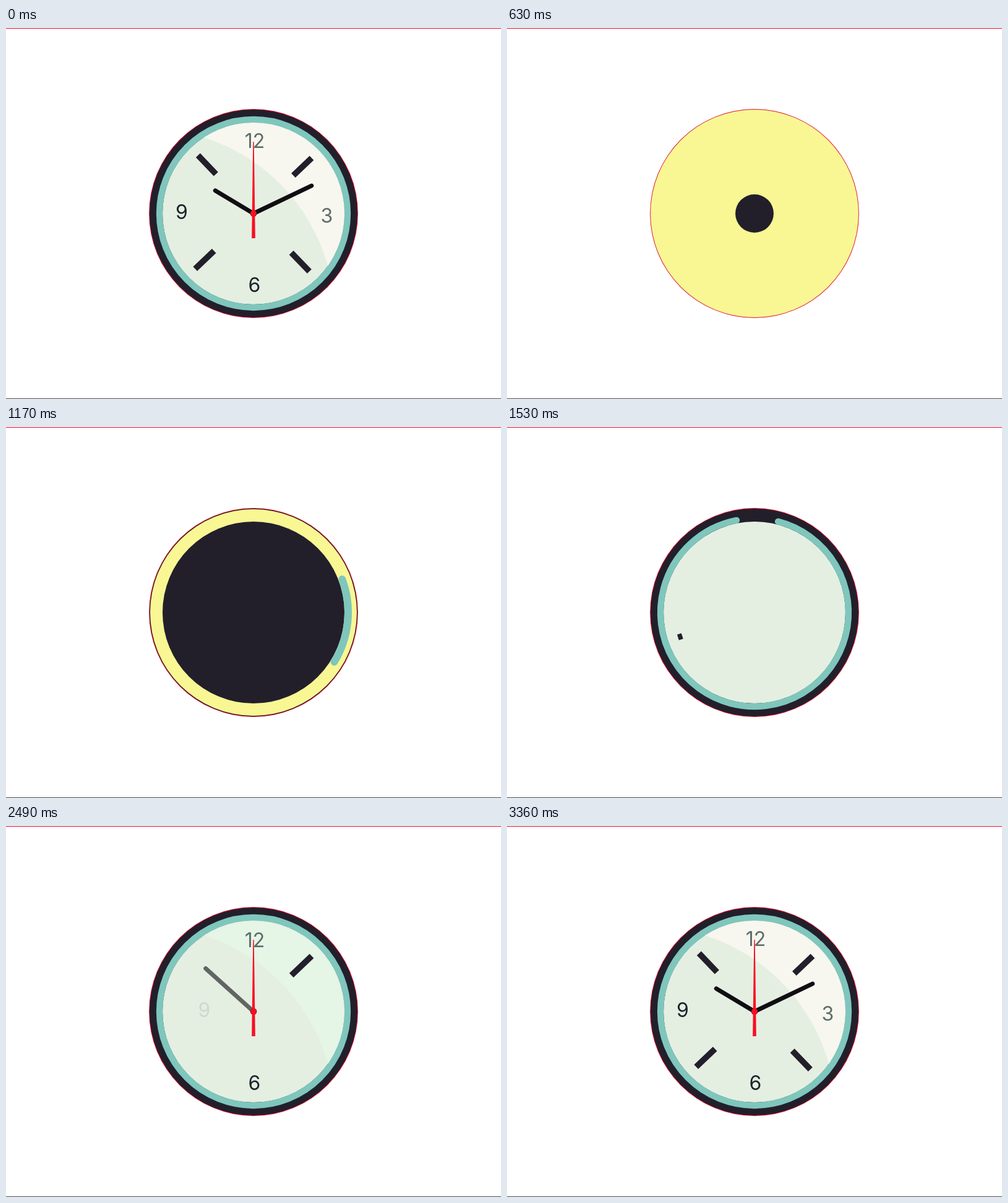
An HTML page with a canvas for the animation above (4890 ms loop, 800 by 600 pixels).

```html
<!DOCTYPE html>
<html lang="en">
<head>
<meta charset="utf-8">
<title>Clock</title>
<style>
html, body { margin: 0; width: 100%; height: 100%; overflow: hidden; background: #fff; }
canvas { display: block; width: 800px; height: 600px; }
</style>
</head>
<body>
<canvas id="stage" width="800" height="600"></canvas>
<script>
const ctx = document.getElementById('stage').getContext('2d');
const LOOP = 4890, STEP = 30, REST = 3360;
const CX = 400, CY = 300, RIM = 168, FACE = 147;
const DARK = '#221f2b', TEAL = '#7fc6bd', PALE = '#e4efe2', YELLOW = '#f8f794', RED = '#fb0d22';
const rad = deg => deg * Math.PI / 180;
const smooth = u => u * u * (3 - 2 * u);

// Eased value through [time, value] keys.
function key(t, ...keys) {
  if (t <= keys[0][0]) return keys[0][1];
  for (let i = 1; i < keys.length; i++) {
    const [t0, a] = keys[i - 1], [t1, b] = keys[i];
    if (t < t1) return a + (b - a) * smooth((t - t0) / (t1 - t0));
  }
  return keys[keys.length - 1][1];
}

const ramp = (t, from, to) => key(t, [from, 0], [to, 1]);
const pop = (t, t0) => key(t, [t0, 0], [t0 + 215, 1.107], [t0 + 365, 0.99], [t0 + 485, 1]);

function disc(r, color) {
  if (r <= 0) return;
  ctx.fillStyle = color;
  ctx.beginPath();
  ctx.arc(CX, CY, r, 0, 7);
  ctx.fill();
}

// Line along a radius, between two distances from the centre.
function spoke(deg, r0, r1, width, color, cap = 'butt') {
  if (r0 === r1) return;
  const c = Math.cos(rad(deg)), s = Math.sin(rad(deg));
  ctx.strokeStyle = color;
  ctx.lineWidth = width;
  ctx.lineCap = cap;
  ctx.beginPath();
  ctx.moveTo(CX + c * r0, CY + s * r0);
  ctx.lineTo(CX + c * r1, CY + s * r1);
  ctx.stroke();
}

function numeral(text, x, y, color, alpha) {
  ctx.globalAlpha = alpha;
  ctx.fillStyle = color;
  ctx.fillText(text, x, y + 11.5);
  ctx.globalAlpha = 1;
}

function drawBody(t) {
  const yellow = RIM * pop(t, 0);
  disc(yellow + 0.9, '#e0102c');
  if (t >= 1110) disc(RIM, DARK);
  if (t < 1440) disc(key(t, [1080, yellow], [1170, RIM - 1], [1410, FACE - 1]), YELLOW);
  if (t < 1560) disc(FACE * pop(t, 570), DARK);
  disc(FACE * ramp(t, 1200, 1470), PALE);
}

function drawRing(t) {
  if (t < 1110) return;
  const from = key(t, [1080, 4], [1170, -20.6], [1530, -75.5], [1680, -90]);
  const to = key(t, [1080, 6], [1170, 31.5], [1530, 259], [1680, 270]);
  ctx.strokeStyle = TEAL;
  ctx.lineWidth = key(t, [1170, 12], [1400, 10.3]);
  ctx.lineCap = 'round';
  ctx.beginPath();
  ctx.arc(CX, CY, key(t, [1170, 153], [1400, 152]), rad(from), rad(to));
  ctx.stroke();
}

function drawGlare(t) {
  const alpha = ramp(t, 2220, 2400);
  if (!alpha) return;
  const warm = ramp(t, 2490, 2700);
  const mix = (a, b) => Math.round(a + (b - a) * warm);
  ctx.save();
  ctx.globalAlpha = alpha;
  ctx.fillStyle = `rgb(${mix(229, 247)},${mix(245, 247)},${mix(230, 239)})`;
  ctx.beginPath();
  ctx.arc(CX, CY, FACE, 0, 7);
  ctx.clip();
  ctx.beginPath();
  ctx.rect(0, 0, 800, 600);
  ctx.arc(229, 465, 302, 0, 2 * Math.PI);
  ctx.fill('evenodd');
  ctx.restore();
}

function drawTicks(t) {
  // Two long bars swing in and cross, then retract.
  if (t < 2340) {
    const tail = 130 - 258 * ramp(t, 1480, 1980);
    const first = key(t, [1440, 155], [1530, 162], [1860, 227]);
    spoke(first, key(t, [2100, tail], [2340, 130]), 130, 9.5, DARK);
  }
  const tail = 130 - 258 * ramp(t, 1680, 2130);
  const second = key(t, [1650, 252], [1980, 317.1], [2520, 316.3]);
  spoke(second, key(t, [2160, tail], [2520, 89]), 130, 9.7, DARK);

  [46, 136.5, 226.4].forEach((deg, i) => {
    const start = 2580 + i * 90;
    spoke(deg, 130 - 42 * ramp(t, start, start + 210), 130, 9.7, DARK);
  });
}

function drawNumerals(t) {
  ctx.font = '32px Inter, "Open Sans", sans-serif';
  ctx.textAlign = 'center';
  const gray = '#5d6d6a', ink = '#1d222b';
  numeral('12', 402, key(t, [2200, 240], [2430, 184], [2730, 184], [2850, 182.5]), gray, ramp(t, 2220, 2430));
  numeral('6', 401.5, key(t, [2220, 360], [2460, 415.5]), ink, ramp(t, 2240, 2450));
  numeral('9', key(t, [2370, 345], [2640, 286], [2760, 268], [2910, 284]), 297, ink, ramp(t, 2460, 2610));
  numeral('3', key(t, [2620, 480], [2820, 531], [2970, 518.5]), 303, gray, ramp(t, 2620, 2760));
}

function drawHands(t) {
  const ink = '#100e13';
  ctx.globalAlpha = ramp(t, 2430, 2535);
  const minute = key(t, [2400, 205], [2490, 222], [2760, 341], [2910, 334.4]);
  spoke(minute, 0, 104, 7, ink, 'round');
  ctx.globalAlpha = ramp(t, 3050, 3150);
  const hour = t < 3240 ? 94 - (3240 - t) * 0.85 : Math.min(211, 94 + (t - 3240) * 0.975);
  spoke(hour, 0, 72, 7, ink, 'round');
  ctx.globalAlpha = 1;

  const size = ramp(t, 2250, 2460);
  if (!size) return;
  disc(5.4 * size, '#3a2028');
  ctx.fillStyle = RED;
  ctx.beginPath();
  ctx.moveTo(CX - 0.7, CY - 116 * size);
  ctx.lineTo(CX + 0.7, CY - 116 * size);
  ctx.lineTo(CX + 2.8, CY + 40 * size);
  ctx.lineTo(CX - 2.8, CY + 40 * size);
  ctx.fill();
  disc(4.8 * size, RED);
}

function draw(t) {
  ctx.fillStyle = '#fff';
  ctx.fillRect(0, 0, 800, 600);
  ctx.fillStyle = '#e6092a';
  ctx.fillRect(0, 0, 800, 1);
  ctx.fillStyle = '#4a4a4d';
  ctx.fillRect(0, 599, 800, 1);
  drawBody(t);
  drawRing(t);
  drawGlare(t);
  drawTicks(t);
  drawNumerals(t);
  drawHands(t);
}

const start = performance.now();
function tick() {
  const t = Math.floor(((performance.now() - start) % LOOP) / STEP) * STEP;
  draw(t < STEP ? REST : t);
  requestAnimationFrame(tick);
}
tick();
</script>
</body>
</html>
```
